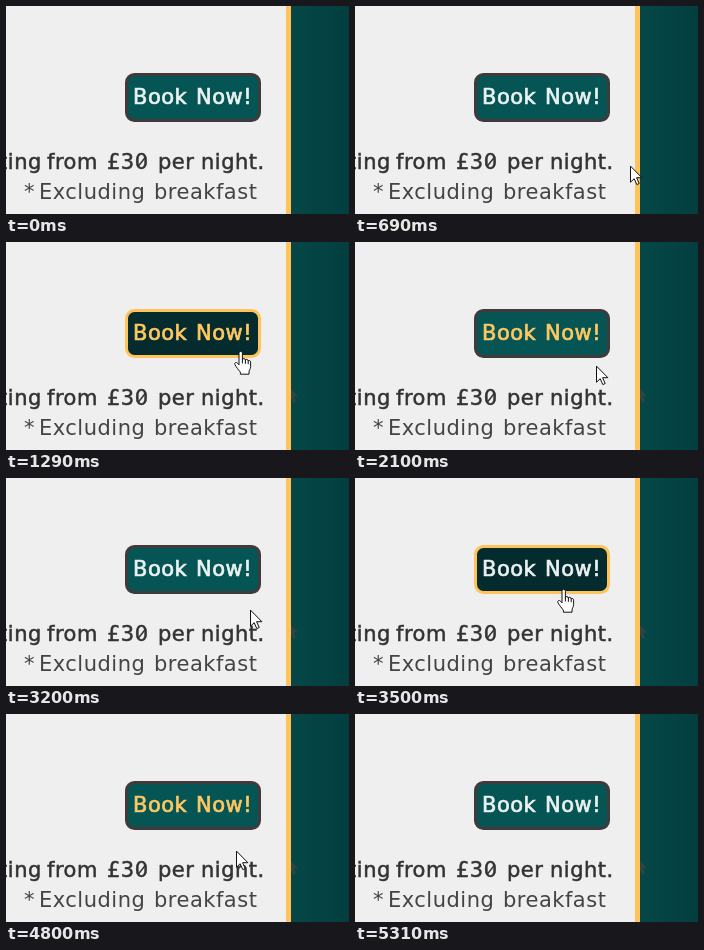
Animation of 343 by 208 pixels, one loop 5810 ms. Source, as an HTML page:

```html
<!DOCTYPE html>
<html lang="en">
<head>
<meta charset="utf-8">
<title>Book Now button</title>
<style>
  html, body { margin: 0; width: 100%; height: 100%; overflow: hidden; background: #efefef; }
  svg { display: block; }
  text { font: 21px "DejaVu Sans", Verdana, sans-serif; letter-spacing: .5px; fill: #333; }
  .strong { stroke: #333; stroke-width: .5px; }
  .light text { fill: #444; }
  .label text { fill: inherit; stroke: inherit; stroke-width: .7px; }
  .cursor path { fill: #fff; stroke: #111; stroke-linejoin: round; stroke-linecap: round; }
</style>
</head>
<body>
<svg width="343" height="208" viewBox="0 0 343 208">
  <defs>
    <linearGradient id="teal">
      <stop offset="0" stop-color="#054748"/>
      <stop offset="1" stop-color="#033e3f"/>
    </linearGradient>
  </defs>
  <rect x="285" width="58" height="208" fill="url(#teal)"/>
  <path id="trace" d="M285 147L292.5 154.5H288L290 160L287.5 161L285 156Z" fill="#2c4546"/>
  <rect x="280" width="5" height="208" fill="#ffc35a"/>

  <rect id="button" x="120.5" y="68.5" width="133" height="46" rx="8" stroke-width="3"/>
  <g id="label" class="label">
    <text x="127" y="98">Book</text>
    <text x="190" y="98">Now!</text>
  </g>

  <g class="strong">
    <text x="-52" y="163">Starting</text>
    <text x="41" y="163">from</text>
    <text x="101" y="163">£30</text>
    <text x="152" y="163">per</text>
    <text x="195" y="163">night.</text>
    <path d="M132 160.5L140 150.5" stroke-width="1.5"/>
  </g>
  <g class="light">
    <text x="18" y="193">*</text>
    <text x="33" y="193">Excluding</text>
    <text x="148" y="193">breakfast</text>
  </g>

  <g id="cursor" class="cursor">
    <path id="arrow" d="M.5 .5V16.2L4.2 12.7L6.8 18.6L9.2 17.5L6.6 11.7H11.5Z"/>
    <g id="hand">
      <path d="M5 13.5V2.3C5 -.1 8.4 -.1 8.4 2.3V8.4C8.8 7.1 11.2 7.3 11.4 9C12 7.8 14 8.2 14.2 9.8C15 9 16.6 9.6 16.6 11.2V15.5C16.6 18 15 19.5 15 21V23.2H6.4V21.2C5 19.5 2.2 16 1 13.8C0 11.8 2.2 10.6 3.4 12Z"/>
      <path d="M8.4 8.4V12M11.4 9V12.4M14.2 9.8V12.8" fill="none"/>
    </g>
  </g>
</svg>
<script>
const LOOP = 5810, STEP = 100;
const easeOut = u => u * (2 - u);
const easeInOut = u => u * u * (3 - 2 * u);

// The pointer arrives, backs off, returns to the button and leaves.
const sweeps = [
  { start: 600, end: 1100, from: [302, 189], to: [228, 109], ease: easeOut },
  { start: 1900, end: 2500, from: [228, 109], to: [252, 136], ease: easeOut },
  { start: 3160, end: 3800, from: [252, 136], to: [188, 104], ease: easeOut },
  { start: 4500, end: 5200, from: [188, 104], to: [294, 189], ease: easeInOut }
];

const $ = id => document.getElementById(id);
const [button, label, cursor, arrow, hand, trace] =
  ["button", "label", "cursor", "arrow", "hand", "trace"].map($);
const lerp = (a, b, k) => a.map((v, i) => Math.round(v + (b[i] - v) * k));
const show = (el, on) => el.setAttribute("visibility", on ? "visible" : "hidden");
const toStep = t => Math.floor((t + 10) / STEP) * STEP;

function pointer(t) {
  const { start, end, from, to, ease } = sweeps.findLast(s => s.start <= t) || sweeps[0];
  const u = Math.min(1, Math.max(0, (t - start) / (end - start)));
  return lerp(from, to, ease(u));
}

const isOver = t => pointer(t)[1] < 118;

// The label colour follows the hover state with a short delay.
const warmth = t => (isOver(t - 2 * STEP) + isOver(t - 3 * STEP)) / 2;

function draw(time) {
  const t = toStep(time % LOOP);
  const present = t >= 600 && t < 5300;
  const over = isOver(t);
  const color = `rgb(${lerp([236, 242, 242], [255, 200, 97], warmth(t))})`;
  button.setAttribute("fill", over ? "#042b2d" : "#055555");
  button.setAttribute("stroke", over ? "#ffc35a" : "#403a3c");
  label.setAttribute("fill", color);
  label.setAttribute("stroke", color);
  cursor.setAttribute("transform", `translate(${pointer(t)})`);
  show(arrow, present && !over);
  show(hand, present && over);
  show(trace, t >= 800);
}

const begin = performance.now();
function frame() {
  // The last sweep ends outside the button, so hover is off until the loop restarts.
  draw(performance.now() - begin);
  requestAnimationFrame(frame);
}
frame();
</script>
</body>
</html>
```
